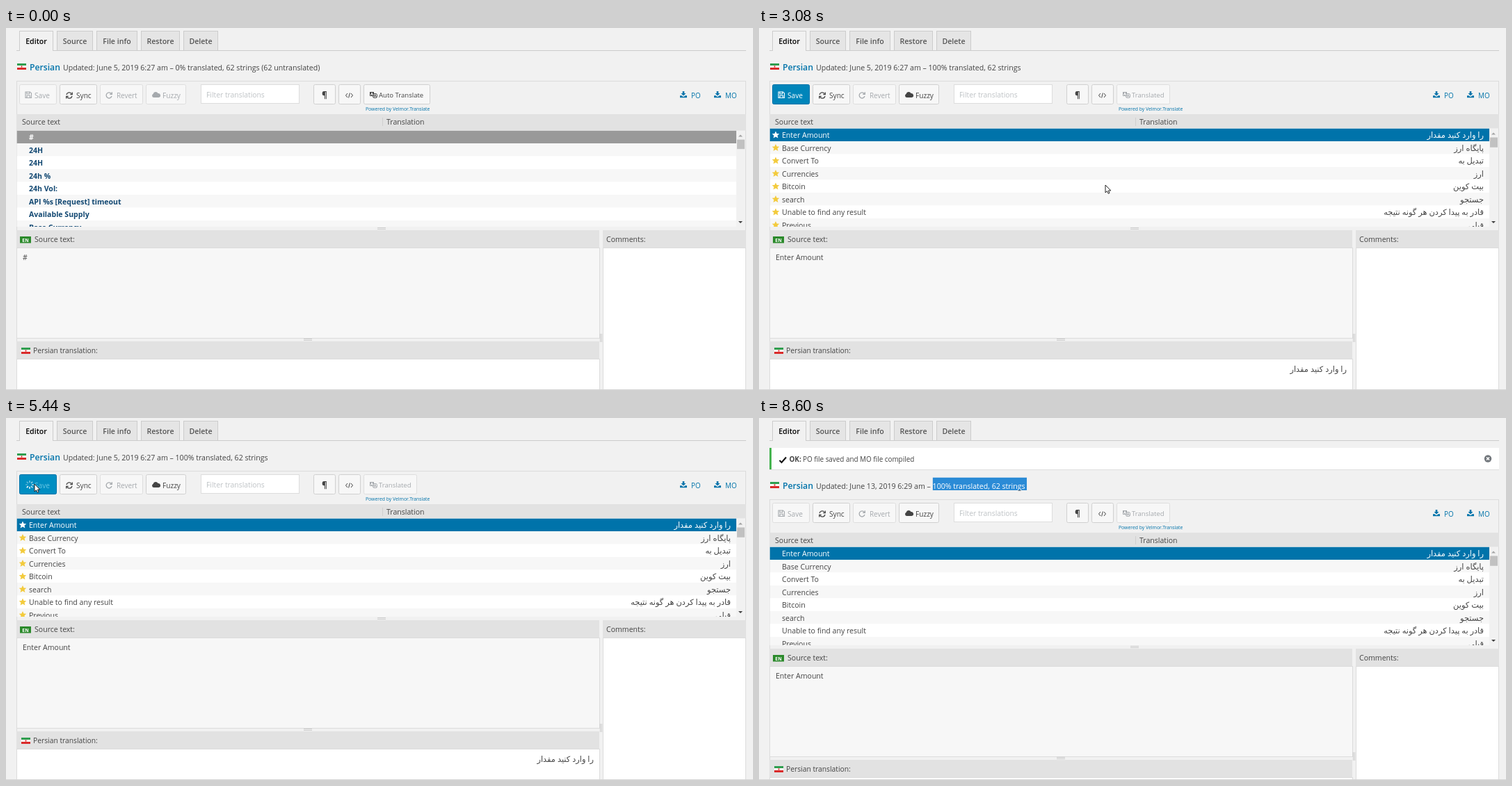
These frames come from a looping animation (1074 px wide and 521 px high, 9.8 s). An HTML page with a canvas:

```html
<!DOCTYPE html>
<html lang="en">
<head>
<meta charset="utf-8">
<title>Translation editor</title>
<style>
html, body { margin: 0; width: 100%; height: 100%; overflow: hidden; background: #f1f1f1; }
canvas { display: block; }
</style>
</head>
<body>
<canvas width="1074" height="521"></canvas>
<script>
const ctx = document.querySelector('canvas').getContext('2d');
const LOOP = 9800, ROW = 18.5, ROW_COUNT = 62, LIST_BOTTOM = 286;
const BLUE = '#0073aa', INK = '#444', FADED = '#a5a9ad', HEADER = '#e2e2e2';

const untranslated = ['#', '24H', '24H', '24h %', '24h Vol:', 'API %s [Request] timeout',
  'Available Supply', 'Base Currency', 'Bitcoin', 'Block', 'BTC Dominance:', 'Buy', 'Changes',
  'Coin Ledger Sum', 'Convert To', 'Currencies', 'down'].map(source => [source]);

const translated = [
  ['Enter Amount', 'را وارد کنید مقدار'], ['Base Currency', 'پایگاه ارز'],
  ['Convert To', 'تبدیل به'], ['Currencies', 'ارز'], ['Bitcoin', 'بیت کوین'],
  ['search', 'جستجو'], ['Unable to find any result', 'قادر به پیدا کردن هر گونه نتیجه'],
  ['Previous', 'قبلی'], ['Next', 'بعدی'], ['Buy', 'خرید'], ['Sell', 'فروش'],
  ['Changes', 'تغییرات'], ['Price', 'قیمت'], ['Name', 'نام'], ['Volume', 'حجم'],
  ['Block', 'بلوک'], ['Time', 'زمان'], ['Rank', 'رتبه'], ['Total', 'مجموع'],
  ['Available Supply', 'عرضه موجود'], ['Symbol', 'نماد'], ['Market Cap', 'درپوش بازار'],
  ['Market Cap:', 'درپوش بازار:'], ['24h Vol:', '24h جلد:'], ['BTC Dominance:', 'BTC تسلط:'],
  ['N/A', 'N/A'], ['down', 'پایین'], ['up', 'تا'], ['Live Price', 'قیمت زنده'],
  ['24h %', '24h %'], ['24H', '24H']
];

const icons = {
  save: 'M.5.5H7L9 2.5V9H.5ZM2.5.5V3.5H6V.5M2.5 9V5.8H7V9',
  sync: 'M1 4A4 4 0 0 1 8.2 2.6M9.3.6V3.6H6.3M9 6A4 4 0 0 1 1.8 7.4M.7 9.4V6.4H3.7',
  revert: 'M8.3 2.5A4 4 0 1 0 9 6M9.3.3V3.4H6.2',
  cloud: 'M3 9A2.7 2.7 0 0 1 2.2 3.8A3.6 3.6 0 0 1 9 3A3 3 0 0 1 10 9Z',
  code: 'M3 1.5L.5 4.5L3 7.5M8 1.5L10.5 4.5L8 7.5M6.4 1L4.6 8',
  download: 'M3.7 0H6.3V3H8.5L5 6.5L1.5 3H3.7ZM0 6.3H2.6L4 7.7H6L7.4 6.3H10V9.2H0Z',
  check: 'M0 5L3 8L9.5.5',
  star: 'M0-5.5L1.6-1.9L5.3-1.7L2.5.8L3.4 4.5L0 2.5L-3.4 4.5L-2.5.8L-5.3-1.7L-1.6-1.9Z',
  arrow: 'M0 0V11L2.5 8.7L4.2 12.3L6 11.5L4.4 8H7.8Z',
  beam: 'M-2 0H2M0 0V11M-2 11H2',
  cross: 'M0 0L4 4M4 0L0 4',
  glyphA: 'M1.2 5.2L3 1L4.8 5.2M1.9 3.7H4.1',
  up: 'M0 3H6L3 0Z',
  down: 'M0 0H6L3 3Z'
};
for (const name in icons) icons[name] = new Path2D(icons[name]);

function box(x, y, w, h, fill, border) {
  ctx.fillStyle = fill;
  ctx.fillRect(x, y, w, h);
  if (!border) return;
  ctx.strokeStyle = border;
  ctx.lineWidth = 1;
  ctx.strokeRect(x + .5, y + .5, w - 1, h - 1);
}

function roundBox(x, y, w, h, fill, border) {
  ctx.beginPath();
  ctx.roundRect(x + .5, y + .5, w - 1, h - 1, 2);
  ctx.fillStyle = fill;
  ctx.fill();
  ctx.strokeStyle = border;
  ctx.lineWidth = 1;
  ctx.stroke();
}

// y is the vertical middle of the line
function text(str, x, y, color = INK, size = 10.55, weight = 400, align = 'left') {
  ctx.font = `${weight} ${size}px "Open Sans", "DejaVu Sans", sans-serif`;
  ctx.direction = align === 'right' ? 'rtl' : 'ltr';
  ctx.textAlign = align;
  ctx.fillStyle = color;
  ctx.fillText(str, x, y + 3.8);
}

const persian = (str, x, y, color) => text(str, x, y, color, 11.4, 400, 'right');

function icon(name, x, y, color, lineWidth = 0) {
  ctx.save();
  ctx.translate(x, y);
  ctx.fillStyle = ctx.strokeStyle = color;
  ctx.lineWidth = lineWidth;
  lineWidth ? ctx.stroke(icons[name]) : ctx.fill(icons[name]);
  ctx.restore();
}

function clipped(x, y, w, h, draw) {
  ctx.save();
  ctx.beginPath();
  ctx.rect(x, y, w, h);
  ctx.clip();
  draw();
  ctx.restore();
}

function flag(x, y) {
  box(x, y, 13, 3, '#2f9e4f');
  box(x, y + 3, 13, 3, '#fff');
  box(x, y + 6, 13, 3, '#da2a2a');
  box(x + 5.5, y + 3.5, 2, 2, '#da2a2a');
}

const mix = (a, b, p) => a + (b - a) * p;

// Progress that jumps n times, first at start and last at end
const stepped = (t, start, end, n) => t < start ? 0 :
  Math.min(1, (Math.floor((t - start) / (end - start) * (n - 1) + .1) + 1) / n);

function stateAt(t) {
  const s = {
    t, done: t >= 3080, hover: t >= 5120, saving: t >= 5320 && t < 5520, saved: t >= 5520,
    scroll: 0, select: 0, autoHover: false, cursor: null
  };
  if (t < 600) return s;
  if (!s.done) {
    const down = stepped(t, 600, 1040, 5), back = stepped(t, 1200, 1680, 6);
    const move = Math.max(0, back * 2 - 1);
    s.scroll = 144 * (down - Math.min(1, back * 2));
    s.cursor = ['arrow', mix(541, 560, move), mix(229, 97, move)];
    s.autoHover = back === 1;
  } else if (!s.saved) {
    const p = stepped(t, 4160, 4920, 8);
    s.scroll = 403 * (1 - Math.abs(2 * p - 1));
    s.cursor = p <= .5
      ? ['arrow', mix(498, 1009, p * 2), mix(226, 235, p * 2)]
      : ['arrow', mix(1009, 41, p * 2 - 1), mix(235, 95, p * 2 - 1)];
  } else if (t < 6880) {
    s.cursor = ['arrow', 255, 104];
  } else {
    s.select = (stepped(t, 6880, 7160, 4) - .25) / .75;
    if (t < 7160) s.cursor = ['beam', mix(253, 383, s.select), 92];
    else if (t < 7400) s.cursor = ['arrow', 352, 106];
  }
  return s;
}

function drawTabs() {
  box(15, 32, 1049, 1, '#ccc');
  [['Editor', 19, 49], ['Source', 73, 52], ['File info', 130, 59], ['Restore', 194, 56], ['Delete', 255, 50]]
    .forEach(([label, x, w], i) => {
      box(x, 4, w, 29, i ? '#e5e5e5' : '#f1f1f1', '#ccc');
      if (!i) box(x + 1, 32, w - 2, 1, '#f1f1f1');
      text(label, x + w / 2, 19.5, i ? '#555' : '#000', 10.6, 600, 'center');
    });
}

function drawNotice() {
  box(15, 43, 1049, 32, '#fff');
  box(15, 74, 1049, 1, '#dedede');
  box(15, 43, 3, 31, '#46b450');
  icon('check', 29.5, 56, '#111', 2.1);
  text('OK:', 43.5, 59.5, INK, 9.9, 700);
  text('PO file saved and MO file compiled', 63, 59.5, INK, 9.9);
  ctx.beginPath();
  ctx.arc(1048, 58.5, 5.2, 0, 7);
  ctx.fillStyle = '#72777c';
  ctx.fill();
  icon('cross', 1046, 56.5, '#fff', 1.5);
}

function drawStatus(s) {
  flag(16, 51);
  text('Persian', 34, 57, BLUE, 12.2, 600);
  const prefix = `Updated: June ${s.saved ? '13, 2019 6:29' : '5, 2019 6:27'} am – `;
  const counts = s.done ? '100% translated, 62 strings' : '0% translated, 62 strings (62 untranslated)';
  const write = color => text(prefix + counts, 82, 57, color, 10.6);
  write(INK);
  if (s.select <= 0) return;
  const start = 82 + ctx.measureText(prefix).width;
  const width = (ctx.measureText(counts).width + 2.5) * s.select;
  clipped(start, 44.5, width, 18.5, () => {
    box(start, 44.5, width, 18.5, '#2b8bd6');
    write('#fff');
  });
}

function button(x, w, on = true, hover = false) {
  roundBox(x, 81, w, 29, hover ? '#fafafa' : '#f7f7f7', on ? (hover ? '#999' : '#d0d0d0') : '#dedede');
  return on ? INK : FADED;
}

function drawSave(s) {
  const active = s.done && !s.saved;
  let color = button(19, 54, false);
  if (active) {
    roundBox(19, 81, 54, 29, s.hover ? '#008ec2' : '#0085ba', '#0073aa');
    color = s.saving ? '#66c6e4' : '#fff';
  }
  text('Save', 41, 97, color, 10.1);
  if (!s.saving) return icon('save', 27.5, 91.5, color, 1.1);
  const turn = Math.floor(s.t / 80);
  ctx.lineWidth = 1.5;
  for (let i = 0; i < 8; i++) {
    const angle = (i + turn) * Math.PI / 4, dx = Math.cos(angle), dy = Math.sin(angle);
    ctx.strokeStyle = `rgba(255,255,255,${.3 + i * .1})`;
    ctx.beginPath();
    ctx.moveTo(34 + dx * 3, 96 + dy * 3);
    ctx.lineTo(34 + dx * 6, 96 + dy * 6);
    ctx.stroke();
  }
}

function drawToolbar(s) {
  drawSave(s);
  icon('sync', 86, 92, button(77, 54), 1.3);
  text('Sync', 101, 97, INK, 10.1);
  icon('revert', 143, 92, button(135, 62, false), 1.3);
  text('Revert', 159, 97, FADED, 9.9);
  const fuzzy = button(201, 58, s.done);
  icon('cloud', 209.5, 91, fuzzy);
  text('Fuzzy', 225, 97, fuzzy, 10.1);

  box(280, 81, 142, 28, '#fff', '#ddd');
  text('Filter translations', 288, 96, '#bfc3c6', 10.35);

  button(442, 32);
  text('¶', 458, 97, INK, 12, 700, 'center');
  button(478, 32);
  icon('code', 488, 92.5, INK, 1);

  const auto = button(514, s.done ? 77 : 96, !s.done, s.autoHover);
  roundBox(527, 94, 7, 7, '#f7f7f7', auto);
  box(523, 92, 6, 6, auto);
  icon('glyphA', 523, 92, '#fff', .9);
  icon('glyphA', 527.7, 94.5, auto, .9);
  text(s.done ? 'Translated' : 'Auto Translate', 536, 96, auto, 9.55);
  text('Powered by Velmor.Translate', 517, 115.5, BLUE, 6.85);

  [['PO', 969], ['MO', 1018]].forEach(([label, x]) => {
    icon('download', x, 91, BLUE);
    text(label, x + 16, 97, BLUE, 9.9);
  });
}

function drawList(s) {
  const left = 15.5, right = 1050, width = right - left;
  const top = s.done ? 144.5 : 147.6, height = LIST_BOTTOM - top;
  const rows = s.done ? translated : untranslated;
  box(15, 124, 1049, top - 124, HEADER);
  text('Source text', 23, 135);
  box(541, 129, 1, 12, '#cfcfcf');
  text('Translation', 547, 135);

  clipped(left, top, 1063 - left, height, () => {
    box(left, top, width, height, '#fff');
    rows.forEach(([source, target], i) => {
      const y = top + i * ROW - s.scroll, middle = y + 9.8;
      if (y > LIST_BOTTOM || y + ROW < top) return;
      const selected = i === 0;
      box(left, y, width, ROW, selected ? (s.done ? BLUE : '#999') : i % 2 ? '#f7f7f7' : '#fff');
      const color = selected ? '#fff' : s.done ? INK : '#124872';
      text(source, 33, middle, color, 10.55, s.done ? 400 : 700);
      if (target) persian(target, 1042, middle, color);
      if (s.done && !s.saved) icon('star', 24, middle - .3, selected ? '#fff' : '#f3cb3d');
    });

    const track = height - 26, content = ROW_COUNT * ROW;
    const thumb = track * height / content;
    const thumbY = top + 13 + (track - thumb) * s.scroll / (content - height);
    box(right, top, 13, height, '#f1f1f1');
    box(1051, thumbY, 11, thumb, '#c1c1c1');
    icon('up', 1053, top + 6, s.scroll ? '#404040' : '#a3a3a3');
    icon('down', 1053, 278, '#404040');
  });
}

function drawPanes(s) {
  box(534, 287, 12, 1, '#ccc');
  box(534, 289, 12, 1, '#ccc');
  const source = s.done ? translated[0][0] : '#';

  box(15, 291, 838, 25, HEADER);
  box(20, 300, 16, 9.5, '#2b8a2b');
  text('EN', 28, 304.6, '#fff', 6.8, 700, 'center');
  text('Source text:', 41, 304);
  box(15, 316, 839, 131, '#f7f7f7', '#dcdcdc');
  text(source, 24, 330);
  box(428, 447, 12, 1, '#ccc');
  box(428, 449, 12, 1, '#ccc');

  box(15, 451, 838, 25, HEADER);
  flag(22, 460);
  text('Persian translation:', 39, 464, INK, 10.3);
  box(15, 476, 839, 90, '#fff', '#dcdcdc');
  if (s.done) persian(translated[0][1], 845, 491, INK);

  box(854, 440, 1, 12, '#ccc');
  box(856, 440, 1, 12, '#ccc');
  box(858, 291, 206, 25, HEADER);
  text('Comments:', 863, 304);
  box(858, 316, 206, 250, '#fff', '#dcdcdc');
}

function drawCursor([shape, x, y]) {
  if (shape === 'beam') return icon('beam', x, y, '#222', 1);
  icon('arrow', x, y, '#fff');
  icon('arrow', x, y, '#222', 1);
}

function render(now) {
  const s = stateAt(now % LOOP);
  box(0, 0, 1074, 521, '#f1f1f1');
  drawTabs();
  if (s.saved) drawNotice();
  ctx.save();
  if (s.saved) ctx.translate(0, 41);
  drawStatus(s);
  box(15, 76, 1049, 500, '#f1f1f1', '#dcdcdc');
  drawToolbar(s);
  drawList(s);
  drawPanes(s);
  ctx.restore();
  box(0, 520, 1074, 1, '#d5d5d5');
  if (s.cursor) drawCursor(s.cursor);
}

const startTime = performance.now();
function loop() {
  render(performance.now() - startTime);
  requestAnimationFrame(loop);
}
loop();
</script>
</body>
</html>
```
